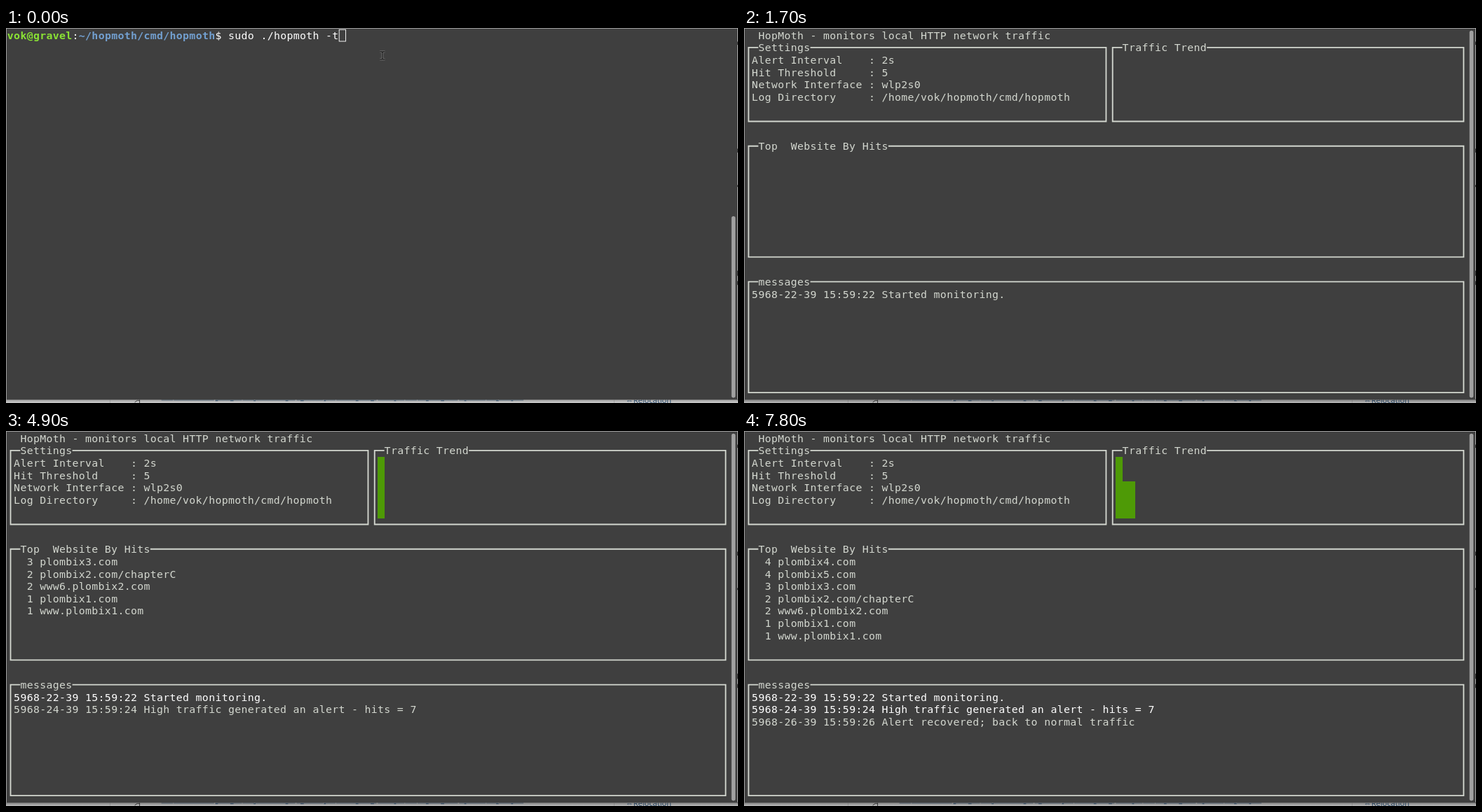
Write an HTML page that moves like this. It is 1044 px wide and 536 px high and loops after 8 s.

```html
<!DOCTYPE html>
<html lang="en">
<head>
<meta charset="utf-8">
<title>Terminal traffic monitor</title>
<style>
  html, body { margin: 0; width: 100%; height: 100%; overflow: hidden; background: #3f3f3f; }
  svg { display: block; width: 1044px; height: 536px; }
  #term text {
    font: 16px "DejaVu Sans Mono", monospace;
    letter-spacing: 0.367px;
    white-space: pre;
  }
  #term .bold { font-weight: bold; }
  #page text { font: 12px "Open Sans", sans-serif; fill: #35618c; }
</style>
</head>
<body>
<svg viewBox="0 0 1126 578" preserveAspectRatio="none">
  <defs>
    <linearGradient id="shade" x1="0" y1="0" x2="0" y2="1">
      <stop offset="0" stop-color="#000" stop-opacity=".5"/>
      <stop offset="1" stop-color="#000" stop-opacity=".22"/>
    </linearGradient>
  </defs>
  <g id="page">
    <rect width="1126" height="578" fill="#f0f0f0"/>
    <path d="M160 573v5M935.5 573v5" stroke="#d0d0d0"/>
    <path d="M198 577l4-3h4M205.500 572v6" stroke="#444" fill="none"/>
    <path d="M239 573.500H796" stroke="#35618c" stroke-dasharray="18 1 62 2 41 1"/>
    <path d="M322 574.500H780" stroke="#35618c" stroke-dasharray="4 19 5 31 3 46"/>
    <text x="953" y="578">⇔Relocation</text>
    <rect id="shadow" y="572" width="1126" height="6" fill="url(#shade)"/>
    <rect x="1125" width="1" height="574" fill="#000" opacity=".3"/>
    <path d="M1125.500 21v5M1125.500 186v6M1125.500 242v3M1125.500 374v8M1125.500 390v6" stroke="#222"/>
  </g>
  <rect width="1125" height="573" fill="#a6a6a6"/>
  <rect x="1" y="1" width="1124" height="572" fill="#3f3f3f"/>
  <g id="term"></g>
</svg>
<script>
const LOOP = 8000, CW = 10, RH = 19, PAD = 2;
const WHITE = '#fff', GREY = '#d3d7cf', GREEN = '#4e9a06';
const term = document.getElementById('term');
const shadow = document.getElementById('shadow');

const colX = c => PAD + c * CW;
const rowY = r => PAD + r * RH;

const put = (c, r, str, fill = GREY, cls = '') =>
  `<text x="${colX(c)}" y="${rowY(r) + 15}" fill="${fill}" class="${cls}">${str}</text>`;

const putLines = (c, r, lines, fill) => lines.map((s, i) => put(c, r + i, s, fill)).join('');

// Frame drawn through cell centres, with a gap in the top edge for its title.
function box(c0, r0, c1, r1, title) {
  const [x0, x1] = [c0, c1].map(c => colX(c) + 5);
  const [y0, y1] = [r0, r1].map(r => rowY(r) + 9);
  const from = colX(c0 + 2), to = from + title.length * CW;
  return `<path d="M${from} ${y0}H${x0}V${y1}H${x1}V${y0}H${to}" fill="none" stroke="${GREY}" stroke-width="2"/>`
    + put(c0 + 2, r0, title);
}

const scrollbar = top =>
  `<rect x="1116" y="${top}" width="6" height="${570 - top}" rx="3" fill="#a0a0a0"/>`;

const pointer = '<path d="M575 36.500h3l1 1 1-1h3M579 37v11M575 48.500h3l1-1 1 1h3" '
  + 'fill="none" stroke="#fff" stroke-width="3" opacity=".35"/>'
  + '<path d="M575 36.500h3l1 1 1-1h3M579 37v11M575 48.500h3l1-1 1 1h3" '
  + 'fill="none" stroke="#111" stroke-width="1.300"/>';

const cursors = {
  hollow: `<rect x="${colX(51) + .5}" y="2.500" width="10" height="18" fill="none" stroke="${WHITE}"/>`,
  solid: `<rect x="${colX(51)}" y="2" width="10" height="19" fill="${WHITE}"/>`,
  off: ''
};

function shell(cursor, showPointer) {
  return put(0, 0, 'vok@gravel', '#8ae234', 'bold')
    + put(10, 0, ':', WHITE)
    + put(11, 0, '~/hopmoth/cmd/hopmoth', '#729fcf', 'bold')
    + put(32, 0, '$ sudo ./hopmoth -t', WHITE)
    + cursors[cursor] + (showPointer ? pointer : '') + scrollbar(290);
}

const settings = [
  'Alert Interval    : 2s',
  'Hit Threshold     : 5',
  'Network Interface : wlp2s0',
  'Log Directory     : /home/vok/hopmoth/cmd/hopmoth'
];

const log = [
  '5968-22-39 15:59:22 Started monitoring.',
  '5968-24-39 15:59:24 High traffic generated an alert - hits = 7',
  '5968-26-39 15:59:26 Alert recovered; back to normal traffic'
];

// bars: heights in rows; sites: [hits, address]; count: visible log lines
function monitor(bars, sites, count) {
  const chart = bars.map((h, i) =>
    `<rect x="${colX(57 + i)}" y="${rowY(7 - h)}" width="${CW}" height="${h * RH}" fill="${GREEN}" shape-rendering="crispEdges"/>`);
  return put(2, 0, 'HopMoth - monitors local HTTP network traffic')
    + box(0, 1, 55, 7, 'Settings') + putLines(1, 2, settings)
    + box(56, 1, 110, 7, 'Traffic Trend') + chart.join('')
    + box(0, 9, 110, 18, 'Top  Website By Hits')
    + putLines(3, 10, sites.map(s => s.join(' ')))
    + box(0, 20, 110, 29, 'messages')
    + putLines(1, 21, log.slice(0, count - 1), WHITE)
    + put(1, 20 + count, log[count - 1])
    + scrollbar(4);
}

const site = n => `plombix${n}.com`;
const pair = [[2, site(2) + '/chapterC'], [2, 'www6.' + site(2)]];
const first = [1, site(1)], last = [1, 'www.' + site(1)];
const third = [3, site(3)];

const steps = [
  [0, shell('hollow', true)],
  [600, shell('solid', true)],
  [1200, shell('off', true)],
  [1600, shell('solid', false)],
  [1700, monitor([], [], 1)],
  [3800, monitor([5], [...pair, first, [1, site(3)], last], 2)],
  [4900, monitor([5], [third, ...pair, first, last], 2)],
  [5800, monitor([5, 3], [third, [3, site(4)], ...pair, first, last], 3)],
  [6800, monitor([5, 3], [[4, site(4)], third, ...pair, first, last], 3)],
  [7800, monitor([5, 3, 3], [[4, site(4)], [4, site(5)], third, ...pair, first, last], 3)]
];

let shown = -1;
const start = performance.now();

function tick() {
  const t = (performance.now() - start) % LOOP;
  const now = steps.findLastIndex(s => s[0] <= t);
  if (now !== shown) {
    shown = now;
    term.innerHTML = steps[now][1];
    shadow.setAttribute('opacity', now ? 1 : 0.7);
  }
  requestAnimationFrame(tick);
}
tick();
</script>
</body>
</html>
```
